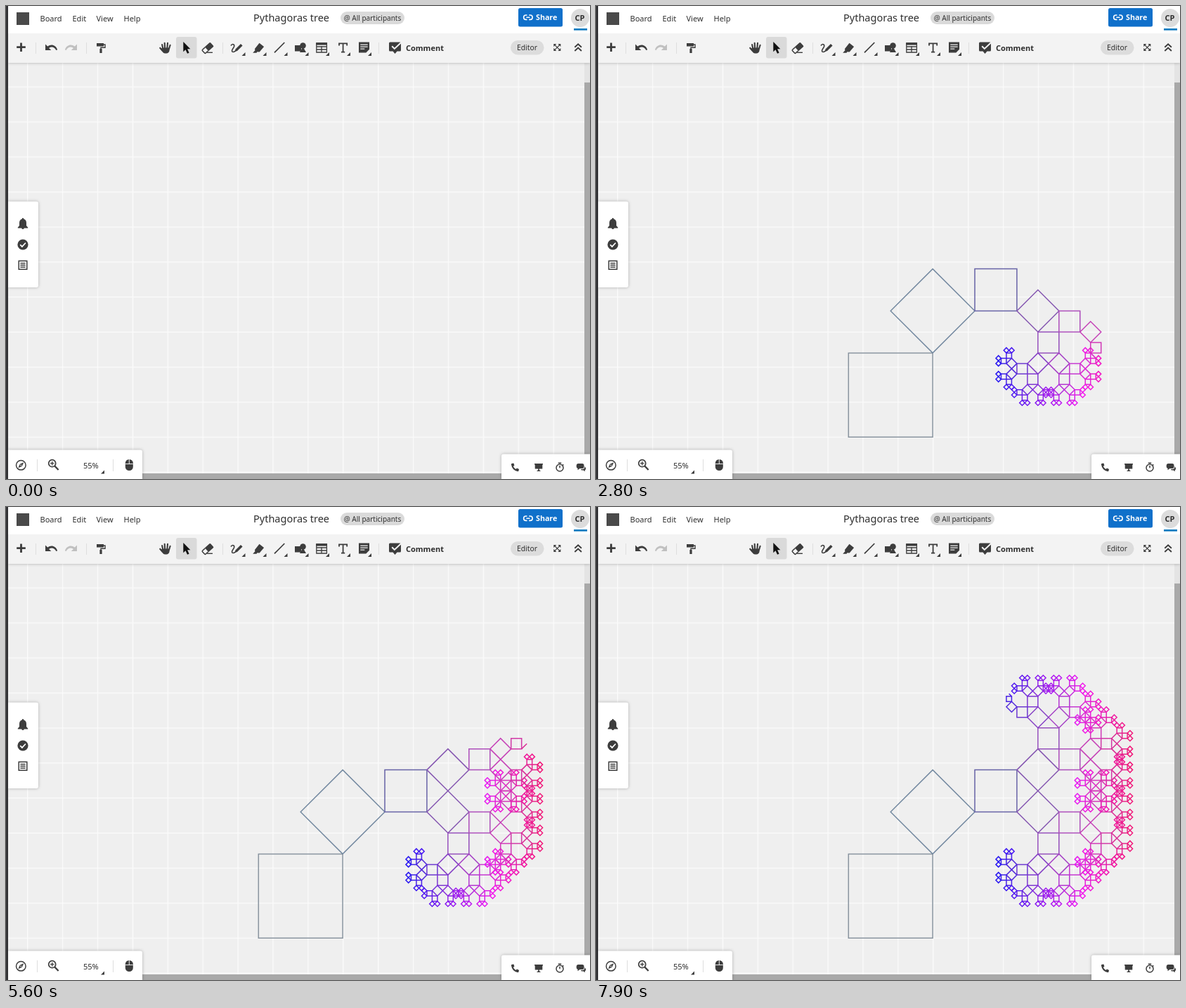
Recreate the animation shown at these times as an HTML page with a canvas. Size 831 by 674 pixels, loop 8 s.

```html
<!DOCTYPE html>
<html lang="en">
<head>
<meta charset="utf-8">
<title>Pythagoras tree</title>
<style>
html, body { margin: 0; width: 100%; height: 100%; overflow: hidden; background: #efefef; }
svg, canvas { position: absolute; left: 0; top: 0; width: 831px; height: 674px; display: block; }
text { font: 500 11px "Noto Sans", "Open Sans", sans-serif; fill: #2f2f2f; }
.mid { text-anchor: middle; }
.icon { fill: #3d3d3d; }
.line { fill: none; stroke: #3d3d3d; stroke-width: 2; }
.panel { fill: #fff; filter: drop-shadow(0 0 2px rgba(0,0,0,.28)); }
.sep { stroke: #dedede; stroke-width: 1; }
</style>
</head>
<body>
<svg viewBox="0 0 831 674">
  <defs>
    <pattern id="grid" x="30" y="114.7" width="49.9" height="49.9" patternUnits="userSpaceOnUse">
      <path d="M0 0H1.3V49.9H0zM0 0H49.9V1.3H0z" fill="#fbfbfb"/>
    </pattern>
    <path id="undo" d="M56 54.5V63h8.3l-3.2-3.1c3.6-2.7 8.2-1.5 10.2 3l1.9-.7c-2.6-7.2-9.3-8.5-14-4.6z"/>
  </defs>

  <rect width="831" height="674" fill="#efefef"/>
  <rect x="3" y="81" width="820" height="585" fill="url(#grid)"/>
  <rect x="823" y="81" width="8" height="593" fill="#a9a9a9"/>
  <rect x="823" y="81" width="8" height="28" fill="#e4e4e4"/>
  <rect x="3" y="666" width="828" height="8" fill="#a9a9a9"/>

  <!-- header and toolbar -->
  <rect class="panel" x="3" y="0" width="828" height="81"/>
  <rect x="3" y="39" width="828" height="42" fill="#f3f3f3"/>
  <rect x="15" y="9" width="18" height="18" fill="#4a4a4a"/>
  <text x="48.5" y="21.5">Board</text>
  <text x="94.5" y="21.5">Edit</text>
  <text x="128.5" y="21.5">View</text>
  <text x="167.5" y="21.5">Help</text>
  <text x="352" y="22" style="font-size:14.5px;font-weight:400">Pythagoras tree</text>
  <rect x="476" y="8" width="91" height="18" rx="9" fill="#dadada"/>
  <text class="mid" x="521.5" y="20.5" style="font-size:10px;font-weight:400">@ All participants</text>
  <rect x="729" y="3" width="63" height="26.5" rx="2.5" fill="#1070ca"/>
  <g fill="none" stroke="#fff" stroke-width="1.6">
    <path d="M741.5 13h-1.7a3.2 3.2 0 0 0 0 6.4h1.7M744.2 13h1.7a3.2 3.2 0 0 1 0 6.4h-1.7M740.4 16.2h5"/>
  </g>
  <text x="754" y="20.2" style="font-weight:600;fill:#fff;font-size:10.7px">Share</text>
  <circle cx="817" cy="17" r="13" fill="#dcdcdc"/>
  <text class="mid" x="816.5" y="21" style="font-weight:600">CP</text>
  <rect x="808" y="32" width="19" height="2.7" fill="#107cc0"/>

  <path class="sep" d="M42.5 52v16M114.5 52v16M308.5 52v16M530.5 52v16"/>
  <rect x="242" y="44" width="29.5" height="30.5" rx="3" fill="#dadada"/>
  <path class="line" d="M15.2 58.7H27.8M21.5 52.4V65" style="stroke-width:2.8"/>
  <use href="#undo" class="icon"/>
  <use href="#undo" transform="translate(157) scale(-1 1)" fill="#c0c0c0"/>
  <path class="icon" d="M129 53h10v4.5h-10z"/>
  <path class="line" d="M139 55h2v4.3h-6v2" style="stroke-width:1.4"/>
  <path class="icon" d="M133.4 61h3.2v6h-3.2z"/>
  <g class="line" style="stroke-linecap:round;stroke-width:2.1">
    <path d="M223.4 61l-1.3-6M226.1 60l-.4-7.3M229.3 60l.7-7.1M232 61l1.6-5.2M222.5 63.5l-3.3-3.8"/>
  </g>
  <path class="icon" d="M222.3 59.5h10.8l-.6 4.2q-1 3.8-4.2 3.8h-2.2q-2 0-3.3-2l-3-4z"/>
  <path d="M252.3 51v14.2l3.2-3 2.5 5.6 2.6-1.1-2.5-5.5h4.2z" fill="#111"/>
  <g transform="rotate(-42 287 60)">
    <path class="icon" d="M285 56h9q1.3 0 1.3 1.3v5.4q0 1.3-1.3 1.3h-9z"/>
    <path class="line" d="M285 56.7h-5q-1 0-1 1v4.6q0 1 1 1h5" style="stroke-width:1.5"/>
  </g>
  <path class="line" d="M286 66.3h8" style="stroke-width:1.4"/>
  <path class="line" d="M320 56.5q2-3 4-1.5t-1 5.5q-3 4.5 0 5 2 .2 4-2" style="stroke-width:1.6"/>
  <path class="icon" d="M325.5 65l1-3.4 7.5-7.7 2.6 2.5-7.6 7.6z"/>
  <path class="icon" d="M354 61l6.5-8.3 6.6 5.3-6.4 7.6-3.2-.3-1 1.4h-5.3l3.2-3.4z"/>
  <path class="line" d="M382 66.3L396.3 52" style="stroke-width:1.7"/>
  <path class="icon" d="M411 56h9v8.5h-9zM418 66l4.5-8 4.5 8z"/>
  <circle class="icon" cx="422.5" cy="56.5" r="4.3"/>
  <path class="line" d="M441.8 53h14.6v13h-14.6zM441.8 58h14.6M441.8 62h14.6M449 57v9" style="stroke-width:1.3"/>
  <path class="icon" d="M441.2 52.2h15.8v3.4h-15.8z"/>
  <path class="line" d="M474 56.5v-3.2h11.2v3.2M479.6 53v12.7M477 65.7h5.2" style="stroke-width:1.8"/>
  <path class="icon" d="M502 51.5h15v10.3l-4.7 4.7H502z"/>
  <path d="M504.3 55.2h10.4M504.3 58.2h10.4M504.3 61.2h6" stroke="#f3f3f3" stroke-width="1.2"/>
  <g id="corners" class="icon"></g>
  <path class="icon" d="M546.5 51.5h14q1.5 0 1.5 1.5v10q0 1.5-1.5 1.5h-4l-3 3.5-3-3.5h-4q-1.5 0-1.5-1.5V53q0-1.5 1.5-1.5z"/>
  <path d="M549.2 57.2l3.6 3.7 9.2-8.6" fill="none" stroke="#f3f3f3" stroke-width="2"/>
  <text x="569" y="64" style="font-weight:600">Comment</text>
  <rect x="718" y="49" width="47.5" height="20.5" rx="10.2" fill="#dcdcdc"/>
  <text class="mid" x="741.5" y="63" style="font-size:10.3px">Editor</text>
  <path class="icon" d="M779.3 54h4l-4 4zM789.3 54v4l-4-4zM779.3 64v-4l4 4zM789.3 64h-4l4-4z"/>
  <path class="line" d="M780.5 55.2l7.6 7.6M788.1 55.2l-7.6 7.6" style="stroke-width:1.2"/>
  <path class="line" d="M809.3 58.8l4.8-4.5 4.8 4.5M809.3 64l4.8-4.5 4.8 4.5" style="stroke-width:1.9"/>

  <!-- side panel -->
  <path class="panel" d="M3 278.5h40q3 0 3 3v116.500q0 3-3 3H3z"/>
  <path class="icon" d="M24 302q1.300 0 1.300 1.500 3.700 1 3.700 5.500v4l2.200 2.500v1H16.800v-1L19 313v-4q0-4.500 3.700-5.500 0-1.500 1.300-1.500zM22.300 316.500h3.400q0 1.600-1.700 1.600t-1.700-1.600z"/>
  <circle class="icon" cx="24" cy="340" r="7.600"/>
  <path d="M20.200 340.200l2.700 2.700 5-5.400" fill="none" stroke="#fff" stroke-width="1.700"/>
  <path class="line" d="M18.200 363.200h11.600v12H18.200zM20.400 366.500h7.200M20.400 369.200h7.200M20.400 371.900h7.200" style="stroke-width:1.500"/>

  <!-- bottom panels -->
  <path class="panel" d="M3 632.500h188q3 0 3 3V674H3z"/>
  <path class="sep" d="M44.500 646v17M152.500 646v17"/>
  <circle class="line" cx="21.300" cy="654.300" r="6.800" style="stroke-width:1.500"/>
  <path class="icon" d="M25.300 650.300l-2.500 5.500-5.500 2.500 2.500-5.500z"/>
  <circle cx="21.300" cy="654.300" r=".9" fill="#fff"/>
  <circle class="line" cx="65.700" cy="651.700" r="5" style="stroke-width:1.700"/>
  <path class="line" d="M69.300 655.500l5.300 5.500" style="stroke-width:2.300"/>
  <path class="line" d="M63 651.700h5.400M65.700 649v5.400" style="stroke-width:1.300"/>
  <text x="110" y="658.500">55%</text>
  <path class="icon" d="M140 661.500v5h-5z"/>
  <rect class="icon" x="169.800" y="646" width="11" height="16" rx="5.300"/>
  <path d="M169.800 652.500h11M175.300 646v6.500" stroke="#fff" stroke-width=".9"/>

  <path class="panel" d="M831 638.500H708q-3 0-3 3V674h126z"/>
  <path class="icon" d="M719.600 652l2.800-.5 1 3.200-1.600 1.400q1.200 2.700 3.600 4l1.600-1.500 3 1.300-.6 2.700q-.3.700-1.200.6-8-1.500-9.300-10 0-1 .7-1.200z"/>
  <path class="icon" d="M752 652h12v1.500h-.7v6h-4.500v1.500l2.200 2h-6l2.200-2v-1.500h-4.500v-6h-.7z"/>
  <circle class="line" cx="788" cy="658" r="5" style="stroke-width:1.500"/>
  <path class="line" d="M785.800 651.300h4.400M788 655v3.300M792 653.200l1.400 1.300" style="stroke-width:1.500"/>
  <path class="icon" d="M814 652h6q2.500 0 2.500 2.500v2q0 2.500-2.500 2.500h-3.500l-3 2.300v-2.500q-1.800-.5-1.800-2.300v-2q0-2.500 2.300-2.500z"/>
  <path class="icon" d="M823.300 656v1q0 3-3 3h-2.500q.5 1.500 2.200 1.500h1.500l2.300 1.700v-2q1.300-.5 1.300-2t-1.800-3.200z"/>

  <rect width="3" height="674" fill="#333336"/>
</svg>
<canvas id="board"></canvas>

<script>
const PERIOD = 8000, STEP = 100, DEPTH = 10;
const ROOT = { x: 359.3, y: 614.2, size: 119.8 };

// [time in ms, sides drawn so far]
const PACE = [[800, 7], [1200, 59], [1600, 111], [2800, 281], [4200, 474],
  [5600, 661], [6100, 732], [6500, 789], [7000, 860], [7100, 860], [7900, 981]];

document.getElementById('corners').innerHTML =
  [340.5, 370.5, 400.5, 430.5, 460, 490, 520]
    .map(x => `<path d="M${x} 66v5h-5z"/>`).join('');

const board = document.getElementById('board');
const ctx = board.getContext('2d');
const scale = window.devicePixelRatio || 1;
board.width = 831 * scale;
board.height = 674 * scale;
ctx.scale(scale, scale);
ctx.lineWidth = 1.5;

function tint(x, depth) {
  const hue = Math.max(211, 245 + 0.47 * (x - 573));
  return `hsl(${hue}, ${10 + 8.7 * depth}%, ${Math.max(52, 58 - 3.5 * depth)}%)`;
}

// Squares in drawing order: the right branch grows before the left one.
const squares = [];
function grow(ax, ay, bx, by, depth) {
  if (depth === DEPTH) return;
  const dx = bx - ax, dy = by - ay;
  const cx = bx + dy, cy = by - dx;
  const ex = ax + dy, ey = ay - dx;
  const px = (cx + ex + dy) / 2, py = (cy + ey - dx) / 2;
  squares.push({
    points: [[ax, ay], [bx, by], [cx, cy], [ex, ey]],
    color: tint((ax + cx) / 2, depth)
  });
  grow(px, py, cx, cy, depth + 1);
  grow(ex, ey, px, py, depth + 1);
}
grow(ROOT.x, ROOT.y, ROOT.x + ROOT.size, ROOT.y, 0);

function sidesAt(time) {
  const t = Math.floor(time / STEP) * STEP;
  if (t < PACE[0][0]) return 0;
  const i = PACE.findIndex(p => p[0] >= t);
  if (i === 0) return PACE[0][1];
  const [t0, n0] = PACE[i - 1], [t1, n1] = PACE[i];
  return Math.floor(n0 + (n1 - n0) * (t - t0) / (t1 - t0));
}

function draw(sides) {
  ctx.clearRect(0, 0, 831, 674);
  for (const { points, color } of squares) {
    if (sides <= 0) break;
    ctx.strokeStyle = color;
    ctx.beginPath();
    ctx.moveTo(...points[0]);
    for (let i = 1; i <= Math.min(sides, 3); i++) ctx.lineTo(...points[i]);
    if (sides >= 4) ctx.closePath();
    ctx.stroke();
    sides -= 4;
  }
}

const start = performance.now();
let shown = -1;
function tick() {
  const sides = sidesAt((performance.now() - start) % PERIOD);
  if (sides !== shown) draw(shown = sides);
  requestAnimationFrame(tick);
}
tick();
</script>
</body>
</html>
```
